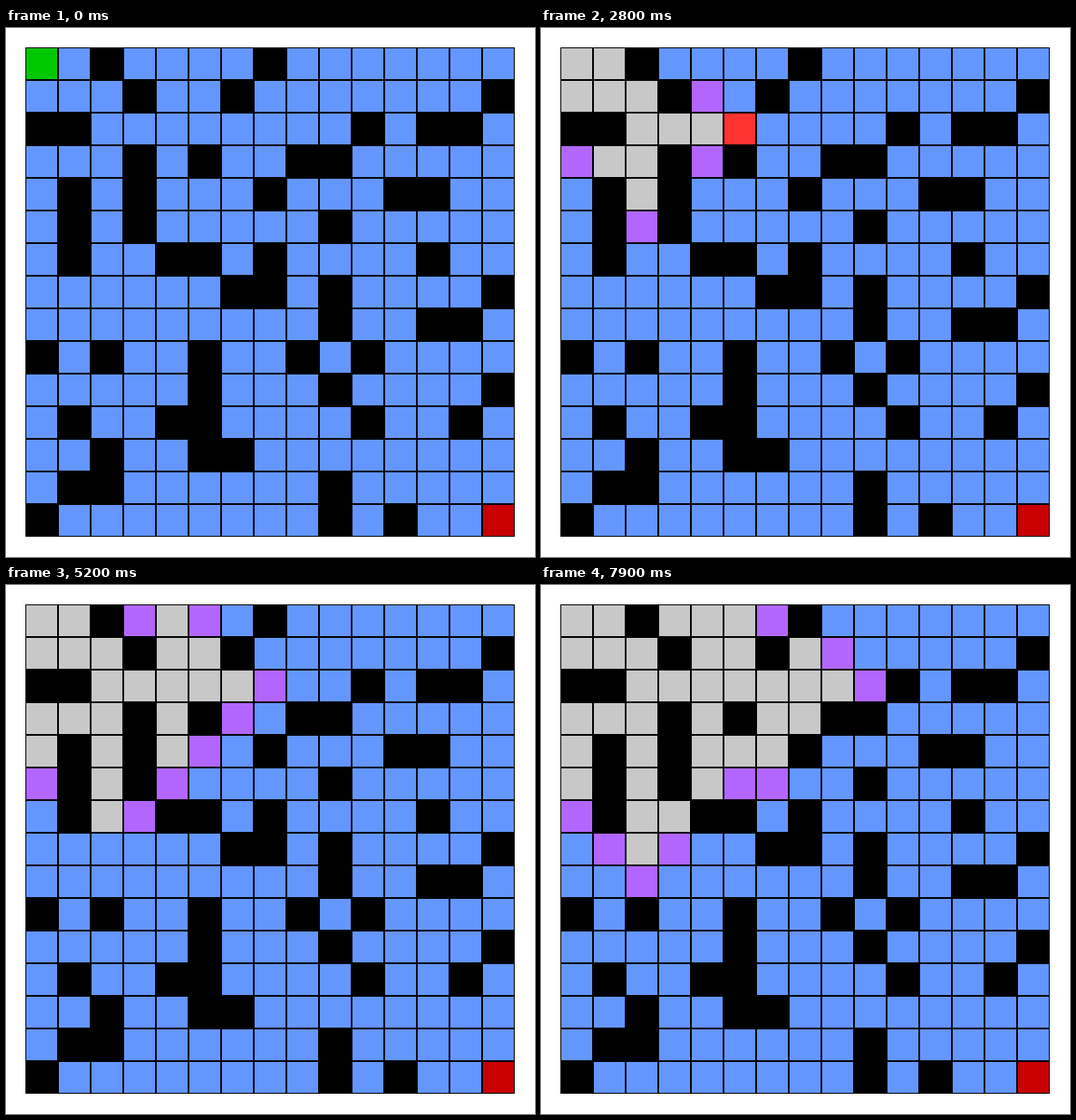
Write a matplotlib script that moves like this. It is 600 px wide and 600 px high and loops after 8 s.

```python
import matplotlib.pyplot as plt
from matplotlib.animation import FuncAnimation
from matplotlib.patches import Rectangle

SIZE, N = 600, 15
PITCH, CELL, LEFT = 37, 35, 23
FRAMES, INTERVAL = 80, 100


def rgb(r, g, b):
    return r / 255, g / 255, b / 255


FREE = rgb(100, 150, 255)
WALL = rgb(0, 0, 0)
START = rgb(0, 200, 0)
GOAL = rgb(200, 0, 0)
QUEUED = rgb(178, 102, 255)
CURRENT = rgb(255, 50, 50)
VISITED = rgb(200, 200, 200)

MAZE = """
..#....#.......
...#..#.......#
##........#.##.
...#.#..##.....
.#.#...#...##..
.#.#.....#.....
.#..##.#....#..
......##.#....#
.........#..##.
#.#..#..#.#....
.....#...#....#
.#..##....#..#.
..#..##........
.##......#.....
#........#.#...
""".split()

STEPS = [(0, 1), (0, -1), (1, 0), (-1, 0)]  # right, left, down, up


def search(start, goal):
    """Breadth-first search, yielding a colour snapshot after every change."""
    colors = {(r, c): WALL if MAZE[r][c] == "#" else FREE
              for r in range(N) for c in range(N)}
    colors[start], colors[goal] = START, GOAL
    yield dict(colors)

    queue, seen = [start], {start}
    colors[start] = QUEUED
    yield dict(colors)

    while queue:
        cell = queue.pop(0)
        colors[cell] = CURRENT
        yield dict(colors)
        if cell == goal:
            return
        colors[cell] = VISITED
        for dr, dc in STEPS:
            nxt = cell[0] + dr, cell[1] + dc
            if colors.get(nxt, WALL) != WALL and nxt not in seen:
                seen.add(nxt)
                queue.append(nxt)
                colors[nxt] = QUEUED
                yield dict(colors)


snapshots = [s for s, _ in zip(search((0, 0), (N - 1, N - 1)), range(FRAMES))]

fig = plt.figure(figsize=(SIZE / 100, SIZE / 100), dpi=100, facecolor="white")
ax = fig.add_axes([0, 0, 1, 1])
ax.set_xlim(0, SIZE)
ax.set_ylim(SIZE, 0)
ax.axis("off")


def square(x, y, side, color):
    return ax.add_patch(Rectangle((x, y), side, side, facecolor=color, linewidth=0))


square(LEFT - 1, LEFT - 1, PITCH * N, WALL)
cells = {(r, c): square(LEFT + PITCH * c, LEFT + PITCH * r, CELL, color)
         for (r, c), color in snapshots[0].items()}


def update(i):
    for pos, color in snapshots[i].items():
        cells[pos].set_facecolor(color)
    return list(cells.values())


anim = FuncAnimation(fig, update, frames=FRAMES, interval=INTERVAL,
                     repeat=True, repeat_delay=0, blit=False)
plt.show()
```
